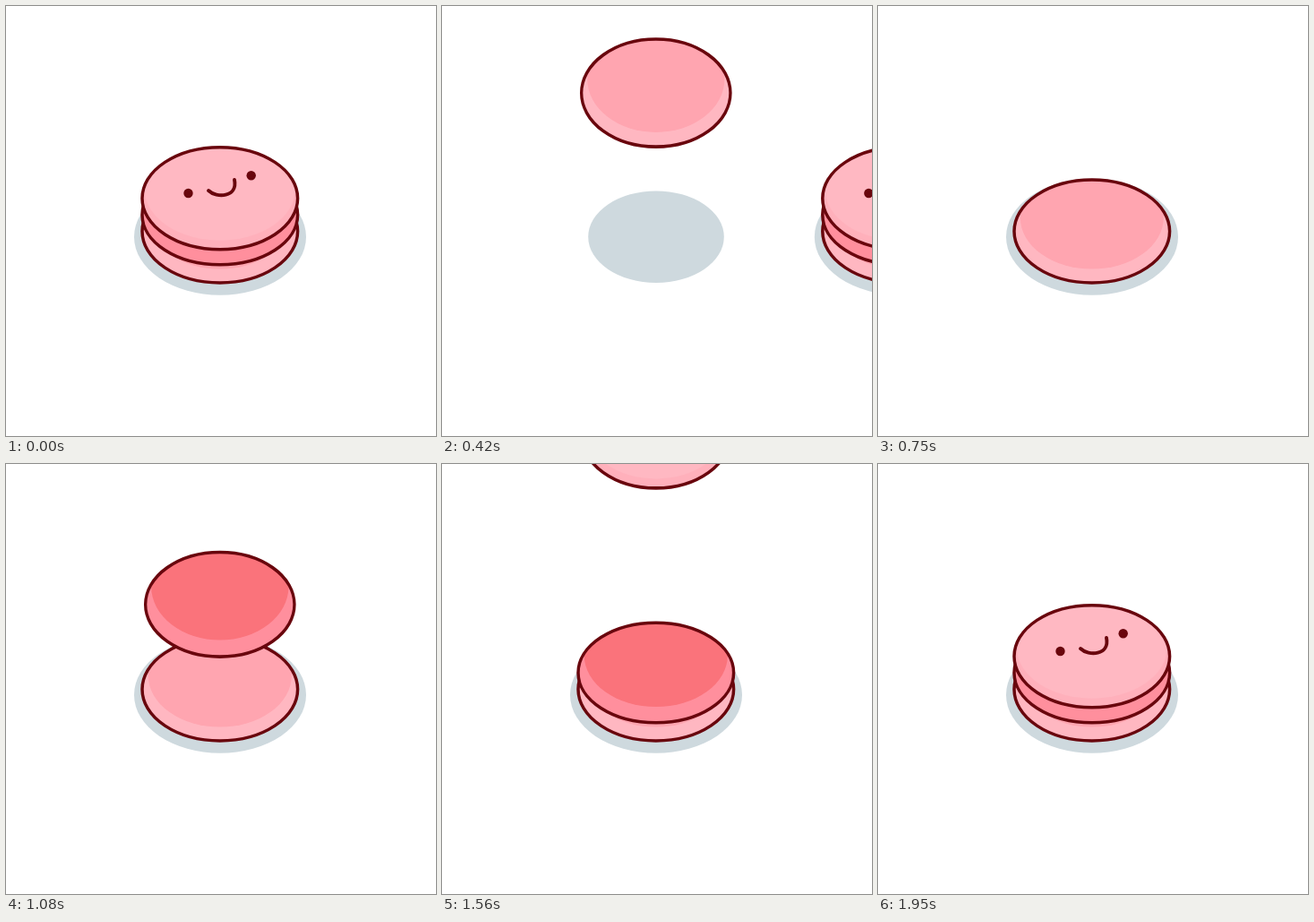
An HTML page with a canvas for the animation above (2.25 s loop, 480 px wide and 480 px high).

```html
<!DOCTYPE html>
<html lang="en">
<head>
<meta charset="utf-8">
<title>Macaron</title>
<style>
html, body { margin: 0; height: 100%; overflow: hidden; background: #fff; }
canvas { display: block; width: 100vw; height: 100vh; }
</style>
</head>
<body>
<canvas id="stage" width="480" height="480"></canvas>
<script>
const ctx = document.getElementById('stage').getContext('2d');
const LOOP = 2250, STEP = 30, CENTER = 238.8;
const START = 150, MOVE = 450, SETTLE = 150, OVERSHOOT = 4;
const INK = '#69060d';

// Layers from bottom to top; dip is where the inner tone ends below the centre.
const LAYERS = [
  { y: 251.5, ry: 57.5, dip: 42, rim: '#ffb7c1', inner: '#ffa5b0', start: 150, travel: 450 },
  { y: 233, ry: 55.8, dip: 38, rim: '#ff8f9d', inner: '#fa737b', start: 750, travel: 457 },
  { y: 214.7, ry: 57, dip: 47, rim: '#ffb0bb', inner: '#ffb8c2', start: 1350, travel: 457, face: true }
];

const clamp = v => Math.min(1, Math.max(0, v));
const smooth = v => (v = clamp(v), v * v * (3 - 2 * v));
const mix = (a, b, k) => a + (b - a) * k;

function ellipse(x, y, rx, ry) {
  ctx.beginPath();
  ctx.ellipse(x, y, rx, ry, 0, 0, Math.PI * 2);
}

function fillEllipse(color, ...shape) {
  ctx.fillStyle = color;
  ellipse(...shape);
  ctx.fill();
}

function shadow(scale) {
  fillEllipse('#ced9de', 239, 257.7, 96 * scale, 65 * scale);
}

function face() {
  fillEllipse(INK, -35.3, -5.7, 5.2, 5.2);
  fillEllipse(INK, 34.9, -25.5, 5.2, 5.2);
  ctx.lineWidth = 3.9;
  ctx.beginPath();
  ctx.moveTo(-12.8, -8.7);
  ctx.bezierCurveTo(-3.8, 0, 20.2, -1, 16.2, -20.7);
  ctx.stroke();
}

function disc(layer, dy = 0, sx = 1, sy = 1) {
  ctx.save();
  ctx.translate(CENTER, layer.y + dy);
  ctx.scale(sx, sy);
  ctx.save();
  ellipse(0, 0, 86.8, layer.ry);
  ctx.clip();
  ctx.fillStyle = layer.rim;
  ctx.fill();
  fillEllipse(layer.inner, 0, layer.dip - 57, layer.face ? 84 : 80, 57);
  ctx.restore();
  ctx.strokeStyle = INK;
  ctx.lineCap = 'round';
  ctx.lineWidth = 3.5;
  ellipse(0, 0, 86.8, layer.ry);
  ctx.stroke();
  if (layer.face) face();
  ctx.restore();
}

// Fall stretched, squash on landing, then spring back to rest.
function drop(layer, time) {
  const t = time - layer.start;
  if (t <= 0) return;
  const squash = smooth((t - MOVE + 120) / 120);
  const rest = smooth((t - MOVE) / SETTLE);
  const fall = OVERSHOOT - layer.travel * (1 - smooth(t / MOVE));
  disc(layer,
    mix(fall, 0, rest),
    mix(mix(0.958, 1.057, squash), 1, rest),
    mix(mix(1.045, 0.93, squash), 1, rest));
}

function draw(t) {
  ctx.fillStyle = '#fff';
  ctx.fillRect(0, 0, 480, 480);
  const s = clamp((t - START) / MOVE);
  shadow(1 - (1 - s) ** 1.7);
  if (s < 1) {
    ctx.save();
    ctx.translate(421 * smooth(s), 0);
    shadow(1);
    LAYERS.forEach(layer => disc(layer));
    ctx.restore();
  }
  LAYERS.forEach(layer => drop(layer, t));
}

const origin = performance.now();
function tick() {
  const t = (performance.now() - origin) % LOOP;
  draw(Math.floor(t / STEP) * STEP);
  requestAnimationFrame(tick);
}
tick();
</script>
</body>
</html>
```
